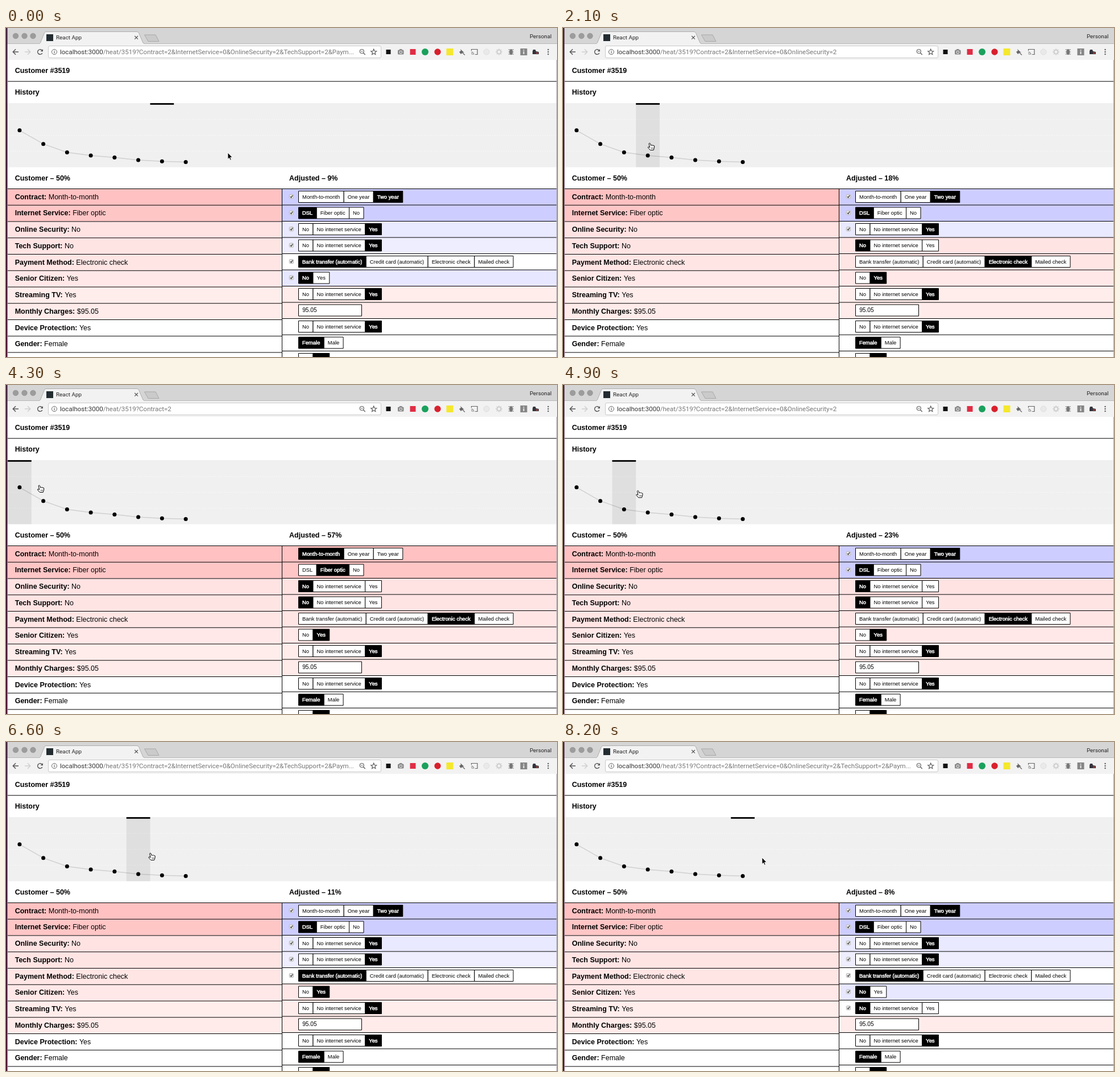
Write an HTML page with a canvas that moves like this. It is 969x578 px and loops after 8300 ms.

```html
<!DOCTYPE html>
<html lang="en">
<head>
<meta charset="utf-8">
<title>Customer heat view</title>
<style>
html, body { margin: 0; width: 100%; height: 100%; overflow: hidden; background: #fff; }
canvas { display: block; }
</style>
</head>
<body>
<canvas id="stage" width="969" height="578"></canvas>
<script>
const ctx = document.getElementById('stage').getContext('2d');
const LOOP = 8300, STEP = 100, LAG = 160;
const PAGE_FONT = '"Liberation Sans", Arial, sans-serif';
const UI_FONT = 'Roboto, sans-serif';
const COL = 41.75, LEFT = 3, RIGHT = 968, SPLIT = 485.5, TABLE = 282;
const SCORES = [57, 36, 23, 18, 15, 11, 9, 8];

// Pointer tip: time, x, y
const PATH = [
  [0, 390, 219], [300, 390, 219], [1200, 258.5, 217], [1800, 176, 207], [2100, 152, 202],
  [3000, 42, 178], [3400, 21, 172], [4000, 24, 171], [4300, 58, 176], [5200, 168, 190],
  [5500, 180, 192], [6600, 253.5, 195], [8200, 350, 203], [8300, 356, 204]
];

const NO_SERVICE = ['No', 'No internet service', 'Yes'];
// name, value, choices, own choice, adjusted choice, own colour, adjusted colour
const ROWS = [
  ['Contract', 'Month-to-month', ['Month-to-month', 'One year', 'Two year'], 0, 2, '#ffc1c1', '#cdcdff'],
  ['Internet Service', 'Fiber optic', ['DSL', 'Fiber optic', 'No'], 1, 0, '#ffc6c6', '#cdcdff'],
  ['Online Security', 'No', NO_SERVICE, 0, 2, '#ffe3e3', '#e9e9ff'],
  ['Tech Support', 'No', NO_SERVICE, 0, 2, '#ffe4e4', '#eeeeff'],
  ['Payment Method', 'Electronic check',
    ['Bank transfer (automatic)', 'Credit card (automatic)', 'Electronic check', 'Mailed check'], 2, 0, '#ffe6e5', '#fff'],
  ['Senior Citizen', 'Yes', ['No', 'Yes'], 1, 0, '#ffe8e7', '#e7e7ff'],
  ['Streaming TV', 'Yes', NO_SERVICE, 2, 0, '#ffedeb', '#fff'],
  ['Monthly Charges', '$95.05', null, 0, 0, '#ffecea', '#fff'],
  ['Device Protection', 'Yes', NO_SERVICE, 2, 2, '#fff', '#fff'],
  ['Gender', 'Female', ['Female', 'Male'], 0, 0, '#fff', '#fff'],
  ['Partner', 'Yes', ['No', 'Yes'], 1, 1, '#fff', '#fff']
];
const QUERY = ['Contract=2', 'InternetService=0', 'OnlineSecurity=2', 'TechSupport=2', 'Paym...'];

function rect(x, y, w, h, fill) {
  ctx.fillStyle = fill;
  ctx.fillRect(x, y, w, h);
}
function write(str, x, y, font, color) {
  ctx.font = font;
  ctx.fillStyle = color;
  ctx.fillText(str, x, y);
  return x + ctx.measureText(str).width;
}
const text = (str, x, y, size = 12.5, color = '#000') => write(str, x, y, `${size}px ${PAGE_FONT}`, color);
const heading = (str, x, y) => write(str, x, y, `bold 12.5px ${PAGE_FONT}`, '#000');
const uiText = (str, x, y, size, color) => write(str, x, y, `${size}px ${UI_FONT}`, color);

function shape(points, fill, stroke, width = 1, close = true) {
  ctx.beginPath();
  points.forEach(([x, y]) => ctx.lineTo(x, y));
  if (close) ctx.closePath();
  if (fill) { ctx.fillStyle = fill; ctx.fill(); }
  if (stroke) { ctx.strokeStyle = stroke; ctx.lineWidth = width; ctx.stroke(); }
}
const line = (points, color, width) => shape(points, null, color, width, false);
function circle(x, y, r, fill, stroke, width = 1, from = 0, to = Math.PI * 2) {
  ctx.beginPath();
  ctx.arc(x, y, r, from, to);
  if (fill) { ctx.fillStyle = fill; ctx.fill(); }
  if (stroke) { ctx.strokeStyle = stroke; ctx.lineWidth = width; ctx.stroke(); }
}
function box(x, y, w, h, r, fill, stroke) {
  ctx.beginPath();
  ctx.roundRect(x, y, w, h, r);
  ctx.fillStyle = fill;
  ctx.fill();
  if (stroke) { ctx.strokeStyle = stroke; ctx.lineWidth = 1; ctx.stroke(); }
}

function pointerAt(t) {
  t = Math.max(0, t);
  const i = Math.max(1, PATH.findIndex(p => p[0] >= t));
  const [t0, x0, y0] = PATH[i - 1], [t1, x1, y1] = PATH[i];
  const k = (t - t0) / (t1 - t0);
  return { x: x0 + (x1 - x0) * k, y: y0 + (y1 - y0) * k };
}
// The first entry comes from the right; until then column 6 stays selected.
function columnAt(t) {
  const i = Math.floor((pointerAt(t).x - LEFT) / COL);
  const hover = i < SCORES.length;
  return { hover, index: hover ? i : t < 1200 ? 6 : 7 };
}

function drawTabs() {
  rect(0, 0, 969, 28, '#d6d5d6');
  [17, 32.5, 47.5].forEach(x => circle(x, 14, 4.8, '#9c9c9c', '#8d8d8d', .6));
  line([[0, 27.5], [969, 27.5]], '#b9b9b9');
  ctx.beginPath();
  ctx.moveTo(58, 28);
  ctx.lineTo(60.5, 26);
  ctx.lineTo(67.5, 8.5);
  ctx.quadraticCurveTo(68.5, 6.5, 71, 6.5);
  ctx.lineTo(230, 6.5);
  ctx.quadraticCurveTo(232.5, 6.5, 233.5, 8.5);
  ctx.lineTo(241, 26);
  ctx.lineTo(244, 28);
  ctx.fillStyle = '#f2f2f2';
  ctx.fill();
  ctx.strokeStyle = '#adadad';
  ctx.lineWidth = 1;
  ctx.stroke();
  shape([[243.5, 12], [263, 12], [269, 23.5], [250, 23.5]], '#cacaca', '#a9a9a9');
  rect(71, 11, 12, 12, '#222c31');
  uiText('React App', 88, 20.3, 9.9, '#222');
  line([[226.3, 14], [232, 19.7]], '#555', 1.2);
  line([[232, 14], [226.3, 19.7]], '#555', 1.2);
  uiText('Personal', 921, 18, 9.8, '#222');
}

function drawExtensions() {
  rect(668.5, 38, 8, 8, '#111');
  box(689, 38.5, 10.5, 8, 1.5, '#8a8a8a');
  rect(692, 37, 4.5, 2, '#8a8a8a');
  circle(694.3, 42.5, 2.3, '#8a8a8a', '#f2f2f2');
  rect(710.5, 37, 10, 10, '#e02d45');
  circle(737, 42, 6, '#1aa15c');
  circle(759, 42, 5.7, '#d9202d');
  rect(774.5, 36, 12, 12, '#f5e82d');
  shape([[799, 37], [806, 43.5], [803, 43], [800, 46], [797, 42], [800, 40]], '#666');
  line([[802, 43], [807, 47.5]], '#666', 1.2);
  line([[818.5, 40], [818.5, 37.5], [829, 37.5], [829, 46.5], [825, 46.5]], '#666', 1.2);
  [2, 4.5].forEach(r => circle(818.3, 46.7, r, null, '#666', 1.1, -Math.PI / 2, 0));
  circle(845, 42, 5, '#e9e9e9', '#dedede');
  circle(867, 42, 3.4, null, '#cfcfcf', 2);
  for (let i = 0; i < 8; i++) {
    const c = Math.cos(i * Math.PI / 4), s = Math.sin(i * Math.PI / 4);
    line([[867 + 4 * c, 42 + 4 * s], [867 + 5.8 * c, 42 + 5.8 * s]], '#cfcfcf', 1.5);
  }
  [-3, 0, 3].forEach(d => line([[883.5, 42 + d * 1.3], [893, 42 + d * 1.3]], '#777', 1));
  ctx.beginPath();
  ctx.ellipse(888.2, 42.3, 3, 5, 0, 0, Math.PI * 2);
  ctx.fillStyle = '#777';
  ctx.fill();
  rect(904.5, 36, 12, 12, '#858585');
  rect(909.6, 41, 1.8, 5, '#f2f2f2');
  rect(909.6, 38, 1.8, 1.8, '#f2f2f2');
  shape([[927, 38], [931, 38], [932, 41], [937, 42], [937, 46], [926, 46], [926, 41]], '#34343c');
  rect(932, 43, 4, 2, '#a84540');
  [38, 42, 46].forEach(y => circle(953.5, y, 1.2, '#555'));
}

function drawToolbar(index) {
  rect(0, 28, 969, 28, '#f2f2f2');
  line([[22, 42], [12.5, 42]], '#555', 1.5);
  line([[17, 37.3], [12.3, 42], [17, 46.7]], '#555', 1.5);
  line([[33, 42], [42.5, 42]], '#cfcfcf', 1.5);
  line([[38, 37.3], [42.7, 42], [38, 46.7]], '#cfcfcf', 1.5);
  circle(60, 42, 4.3, null, '#555', 1.5, .5, 5.5);
  shape([[65, 37], [65, 41.3], [60.7, 41.3]], '#555');
  box(74.5, 31.5, 585, 21, 2.5, '#fff', '#c9c9c9');
  circle(85, 42, 4.5, null, '#666', 1);
  rect(84.4, 41.2, 1.2, 3.3, '#666');
  rect(84.4, 39.4, 1.2, 1.2, '#666');
  const query = QUERY.slice(0, index).join('&');
  const x = uiText('localhost:3000', 95, 46, 11.52, '#333');
  uiText('/heat/3519' + (query && '?' + query), x, 46, 11.52, '#777');
  circle(625.8, 41, 3.5, null, '#666', 1.2);
  line([[628.5, 43.7], [631.7, 47]], '#666', 1.5);
  line([[624.2, 41], [627.4, 41]], '#666', 1);
  const star = Array.from({ length: 10 }, (_, i) => {
    const r = i % 2 ? 2.3 : 5.3, a = i * Math.PI / 5 - Math.PI / 2;
    return [646.7 + r * Math.cos(a), 42.3 + r * Math.sin(a)];
  });
  shape(star, null, '#555', 1.1);
  drawExtensions();
}

function drawHistory({ index, hover }) {
  rect(LEFT, 132, RIGHT - LEFT, 112.5, '#f0f0f0');
  ctx.setLineDash([2, 2]);
  [160.5, 188.5, 216.5].forEach(y => line([[LEFT, y], [RIGHT, y]], '#f8f8f8'));
  ctx.setLineDash([]);
  const x = LEFT + index * COL;
  const points = SCORES.map((s, i) => [LEFT + (i + .5) * COL, 244.5 - s * 1.135]);
  line(points, '#d0d0d0', 1.5);
  if (hover) rect(x, 132, COL, 112.5, 'rgba(0,0,0,.07)');
  rect(x, 132, COL, 2.8, '#000');
  points.forEach(([px, py]) => circle(px, py, 3.5, '#000'));
}

function drawChoices(choices, selected, y) {
  let x = 514.5;
  choices.forEach((label, i) => {
    ctx.font = `9.4px ${PAGE_FONT}`;
    const w = ctx.measureText(label).width + 13.5;
    const on = i === selected;
    box(x, y, w, 20, 0, on ? '#000' : '#fff', '#000');
    text(label, x + 6.6, y + 13.2, 9.4, on ? '#fff' : '#000');
    if (on) {
      ctx.strokeStyle = '#fff';
      ctx.lineWidth = .5;
      ctx.strokeText(label, x + 6.6, y + 13.2);
    }
    x += w;
  });
}

function drawTable(index) {
  ROWS.forEach(([name, value, choices, own, adjusted, warm, cool], i) => {
    const ly = TABLE + i * 28.75, ry = TABLE + i * 28.5;
    const changed = i < index;
    rect(LEFT, ly, SPLIT - LEFT, 29, warm);
    rect(SPLIT, ry, RIGHT - SPLIT, 29, changed ? cool : warm);
    rect(LEFT, ly, SPLIT - LEFT, 1, '#000');
    rect(SPLIT, ry, RIGHT - SPLIT, 1, '#000');
    const x = heading(name + ': ', 15.7, ly + 18.5);
    text(value, x, ly + 18.5);
    const y = ry + 4.5;
    if (choices) drawChoices(choices, changed ? adjusted : own, y);
    else {
      box(514.5, y, 111, 20, 0, '#fff', '#000');
      text('95.05', 521.2, y + 13.2, 10.2);
    }
    if (changed) {
      box(498.3, y + 6, 7.2, 7.2, 1.5, '#e4e4e4', '#bbb');
      line([[500, y + 9.8], [501.6, y + 11.4], [504.3, y + 7.3]], '#444', 1.3);
    }
  });
  rect(485, TABLE, 1, 296, '#000');
}

function drawPointer({ x, y }) {
  ctx.save();
  ctx.translate(x, y);
  ctx.lineJoin = 'round';
  if (x > LEFT + COL * SCORES.length) {
    shape([[0, 0], [0, 11.5], [2.6, 9.2], [4.4, 13.2], [6.3, 12.4], [4.6, 8.5], [8, 8.2]], '#000', '#fff', .9);
  } else {
    ctx.beginPath();
    ctx.moveTo(-.9, 1);
    ctx.quadraticCurveTo(.3, -.8, 1.5, 1);
    ctx.lineTo(2.6, 4.4);
    ctx.quadraticCurveTo(4, 3, 4.9, 4.3);
    ctx.quadraticCurveTo(6.2, 3.2, 7, 4.7);
    ctx.quadraticCurveTo(8.6, 4, 8.8, 6);
    ctx.lineTo(8.3, 9.5);
    ctx.lineTo(7.2, 12.5);
    ctx.lineTo(1.4, 12.5);
    ctx.lineTo(-2.4, 8.3);
    ctx.quadraticCurveTo(-2.8, 6.3, -.8, 7);
    ctx.lineTo(.7, 8);
    ctx.closePath();
    ctx.fillStyle = '#fff';
    ctx.fill();
    ctx.strokeStyle = '#000';
    ctx.lineWidth = 1;
    ctx.stroke();
    [3.4, 5, 6.6].forEach(fx => line([[fx, 7.8], [fx, 10.5]], '#333', .7));
  }
  ctx.restore();
}

function drawEdges() {
  const dusk = ctx.createLinearGradient(0, 0, 0, 578);
  dusk.addColorStop(0, '#40203a');
  dusk.addColorStop(.5, '#3a1230');
  dusk.addColorStop(1, '#4d1030');
  rect(0, 0, 2.5, 578, dusk);
  rect(968, 56, 1, 522, '#aaa5ad');
}

function draw(t) {
  const shown = columnAt(t - LAG);
  rect(0, 0, 969, 578, '#fff');
  drawTabs();
  drawToolbar(columnAt(t).index);
  heading('Customer #3519', 15.7, 79);
  rect(LEFT, 93.3, RIGHT - LEFT, 1, '#000');
  heading('History', 15.7, 117);
  drawHistory(shown);
  heading('Customer – 50%', 15.7, 267.5);
  heading(`Adjusted – ${SCORES[shown.index]}%`, 498, 267.5);
  drawTable(shown.index);
  drawEdges();
  drawPointer(pointerAt(t));
}

function frame() {
  const t = performance.now() % LOOP;
  draw(Math.floor(t / STEP) * STEP);
  requestAnimationFrame(frame);
}
frame();
</script>
</body>
</html>
```
